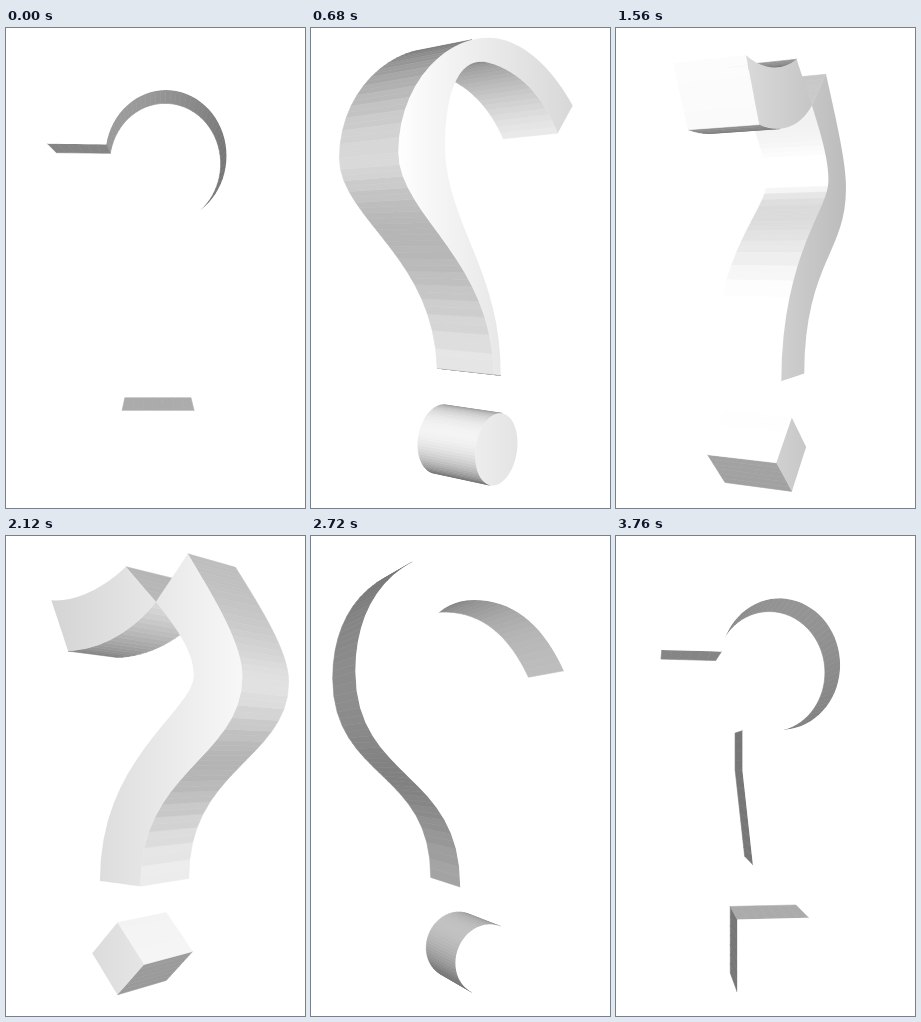
An HTML page with a canvas for the animation above (3800 ms loop, 299x480 px).

```html
<!DOCTYPE html>
<html lang="en">
<head>
<meta charset="utf-8">
<title>Turning question mark</title>
<style>
  html, body { margin: 0; width: 100%; height: 100%; overflow: hidden; background: #fff; }
  canvas { display: block; }
</style>
</head>
<body>
<canvas id="stage" width="299" height="480"></canvas>
<script>
const ctx = document.getElementById('stage').getContext('2d');
const LOOP = 3800, STEP = 40, TURNS = 2;
const CX = 149.5, CY = 224, EYE = 850, HALF = 36.5;
const LIGHT = [70, -50, 620];

// Chain of cubic Béziers: a start point, then two controls and an end for each.
function curve(x, y, ...rest) {
  const out = [[x, y]], steps = 16;
  for (let i = 0; i < rest.length; i += 6) {
    const [ax, ay, bx, by, ex, ey] = rest.slice(i, i + 6);
    const [sx, sy] = out[out.length - 1];
    for (let k = 1; k <= steps; k++) {
      const t = k / steps, u = 1 - t;
      const mix = (p, q, r, s) => u * u * u * p + 3 * u * u * t * q + 3 * u * t * t * r + t * t * t * s;
      out.push([mix(sx, ax, bx, ex), mix(sy, ay, by, ey)]);
    }
  }
  return out;
}

function arc(cx, cy, rx, ry, from, to) {
  const n = Math.ceil(Math.abs(to - from) / 5);
  return Array.from({ length: n + 1 }, (_, i) => {
    const a = (from + (to - from) * i / n) * Math.PI / 180;
    return [cx + rx * Math.cos(a), cy + ry * Math.sin(a)];
  });
}

// Closed clockwise outline, with long edges cut into short pieces.
function outline(...runs) {
  const pts = runs.flat();
  const next = i => pts[(i + 1) % pts.length];
  const area = pts.reduce((sum, p, i) => sum + p[0] * next(i)[1] - next(i)[0] * p[1], 0);
  if (area < 0) pts.reverse();
  return pts.flatMap((p, i) => {
    const q = next(i), n = Math.ceil(Math.hypot(q[0] - p[0], q[1] - p[1]) / 10);
    return Array.from({ length: n }, (_, k) =>
      [p[0] + (q[0] - p[0]) * k / n, p[1] + (q[1] - p[1]) * k / n]);
  });
}

// Round, square or diamond dot: a circle with 72 or 4 corners.
function dot(x, y, r, corners, turn = 0) {
  return outline(Array.from({ length: corners }, (_, i) => {
    const a = turn + i * 2 * Math.PI / corners;
    return [x + r * Math.cos(a), y + r * Math.sin(a)];
  }));
}

const plain = [
  outline(
    arc(10, -92, 114, 111, -174, 55),
    [[38, 22], [24, 100], [-17, 100], [-27, 10], [-27, -28]],
    arc(10, -92, 58, 63, 90, -170)
  ),
  dot(2.5, 186.5, 48.8, 4, Math.PI / 4)
];

const tapered = [
  outline(
    curve(-154, -163, -115, -195, -70, -211, -27, -211,
      45, -211, 130, -155, 130, -85, 130, -30, 0, 5, -7, 120),
    curve(-18, 122, -19, 20, 66, -25, 68, -95,
      68, -150, 45, -184, 0, -184, -50, -184, -95, -165, -123, -129)
  ),
  dot(-12, 194, 35, 72)
];

const broken = [
  outline(
    curve(-115, -169, -78, -162, -35, -172, -6, -188),
    curve(33, -149, 5, -125, -40, -110, -89, -113)
  ),
  outline(
    curve(72, -188, 105, -140, 133, -100, 133, -72, 133, 0, 13, 10, 13, 121),
    curve(-42, 121, -42, 0, 79, -45, 79, -76, 79, -100, 55, -125, 33, -149)
  ),
  dot(-17.5, 195, 35.5, 4)
];

const even = [
  outline(
    curve(-146, -105, -120, -170, -75, -203, -12, -203,
      70, -203, 121, -155, 121, -80, 121, 20, 17, 10, 17, 121),
    curve(-40, 121, -40, 0, 62, 10, 62, -80,
      62, -128, 34, -154, -5, -154, -45, -154, -75, -132, -98, -90)
  ),
  dot(-12, 193, 34, 72)
];

// The mark changes each time it is seen edge-on.
const marks = [plain, tapered, broken, even];

function draw(angle) {
  const c = Math.cos(angle), s = Math.sin(angle);
  const toModel = ([x, y, z]) => [x * c + z * s, y, z * c - x * s];
  const eye = toModel([0, 0, EYE]), light = toModel(LIGHT);

  const project = ([x, y], z) => {
    const k = EYE / (EYE - x * s - z * c);
    return [CX + (x * c - z * s) * k, CY + y * k];
  };
  const shade = (p, normal) => {
    const ray = light.map((v, i) => v - p[i]);
    const lit = ray.reduce((sum, v, i) => sum + v * normal[i], 0) / Math.hypot(...ray);
    const g = Math.round(119 + 136 * Math.min(1, Math.max(0, lit / 0.8)));
    return `rgb(${g},${g},${g})`;
  };
  const trace = pts => {
    pts.forEach((p, i) => i ? ctx.lineTo(...p) : ctx.moveTo(...p));
    ctx.closePath();
  };

  ctx.fillStyle = '#fff';
  ctx.fillRect(0, 0, 299, 480);

  const mark = marks[Math.floor(angle / Math.PI + 0.5) % marks.length];
  const walls = [];
  for (const pts of mark) {
    pts.forEach((a, i) => {
      const b = pts[(i + 1) % pts.length];
      const dx = b[0] - a[0], dy = b[1] - a[1], len = Math.hypot(dx, dy);
      const normal = [dy / len, -dx / len, 0];
      const mid = [(a[0] + b[0]) / 2, (a[1] + b[1]) / 2, 0];
      const ex = eye[0] - mid[0], ey = eye[1] - mid[1];
      if (ex * normal[0] + ey * normal[1] > 0) {
        walls.push({ a, b, normal, mid, far: Math.hypot(ex, ey) });
      }
    });
  }
  walls.sort((p, q) => q.far - p.far);
  ctx.lineWidth = 0.6;
  for (const { a, b, normal, mid } of walls) {
    ctx.beginPath();
    trace([project(a, HALF), project(b, HALF), project(b, -HALF), project(a, -HALF)]);
    ctx.fillStyle = ctx.strokeStyle = shade(mid, normal);
    ctx.fill();
    ctx.stroke();
  }

  if (Math.abs(eye[2]) <= HALF) return;
  const side = Math.sign(eye[2]), z = side * HALF;
  const ends = [-150, 130].map(x => [x, -40]);
  const fill = ctx.createLinearGradient(project(ends[0], z)[0], 0, project(ends[1], z)[0], 0);
  ends.forEach((p, i) => fill.addColorStop(i, shade([...p, z], [0, 0, side])));
  ctx.beginPath();
  mark.forEach(pts => trace(pts.map(p => project(p, z))));
  ctx.fillStyle = fill;
  ctx.fill();
}

const start = performance.now();
function tick() {
  const t = (performance.now() - start) % LOOP;
  draw(Math.floor(t / STEP) * STEP / LOOP * TURNS * 2 * Math.PI);
  requestAnimationFrame(tick);
}
tick();
</script>
</body>
</html>
```
